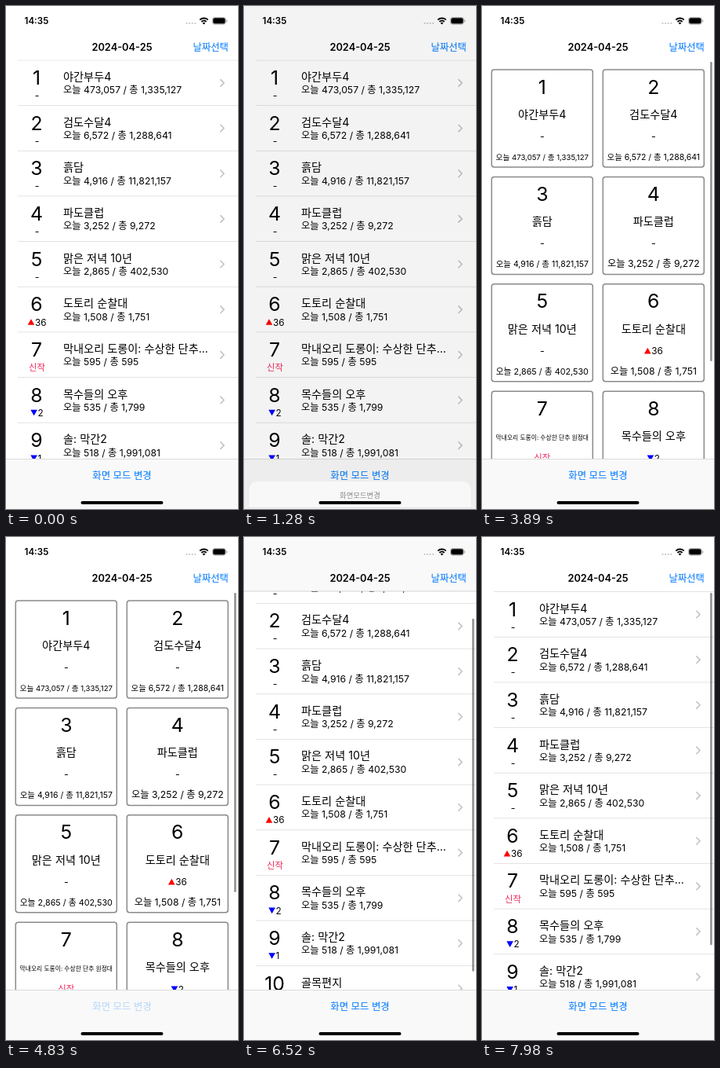
Recreate the animation shown at these times as an HTML page. Size 296 by 640 pixels, loop 8340 ms.

```html
<!DOCTYPE html>
<html lang="ko">
<head>
<meta charset="utf-8">
<style>
html, body { margin: 0; width: 100%; height: 100%; overflow: hidden; background: #fff; }
svg { display: block; width: 296px; height: 640px; }
text { font-family: Inter, 'Noto Sans CJK KR', 'Noto Sans CJK', sans-serif; white-space: pre; }
</style>
</head>
<body>
<svg id="stage" viewBox="0 0 296 640" xmlns="http://www.w3.org/2000/svg"></svg>
<script>
const LOOP = 8340, TOP = 69, VIEW = 507, ROW = 57.65, CELL = 136.4;
const BLUE = [0, 122, 255], GRAY = [140, 140, 145];
const LINE = '#dcdcde', CHROME = '#f9f9f9';

// title, today, total, rank change (null: new entry)
const movies = [
  ['야간부두4', '473,057', '1,335,127', 0],
  ['검도수달4', '6,572', '1,288,641', 0],
  ['흙담', '4,916', '11,821,157', 0],
  ['파도클럽', '3,252', '9,272', 0],
  ['맑은 저녁 10년', '2,865', '402,530', 0],
  ['도토리 순찰대', '1,508', '1,751', 36],
  ['막내오리 도롱이: 수상한 단추 원정대', '595', '595', null],
  ['목수들의 오후', '535', '1,799', -2],
  ['솔: 막간2', '518', '1,991,081', -1],
  ['골목편지', '431', '973,210', -4]
];

const text = (x, y, size, str, attrs = '') =>
  `<text x="${x}" y="${y}" font-size="${size}" ${attrs}>${str}</text>`;
const mid = (x, y, size, str, attrs = '') =>
  text(x, y, size, str, 'text-anchor="middle" ' + attrs);
const rect = (x, y, w, h, fill, attrs = '') =>
  `<rect x="${x}" y="${y}" width="${w}" height="${h}" fill="${fill}" ${attrs}/>`;

function change(cx, cy, n) {
  if (n === null) return mid(cx, cy + 4.2, 11.4, '신작', 'fill="#f2295b"');
  if (!n) return mid(cx, cy + 4, 12.5, '-');
  const label = String(Math.abs(n));
  const x = cx - (9 + label.length * 7.3) / 2;
  const [base, tip] = n > 0 ? [cy + 3.6, cy - 4] : [cy - 3.8, cy + 3.8];
  return `<path d="M${x} ${base}h8.6L${x + 4.3} ${tip}z" fill="${n > 0 ? '#f00' : '#00f'}"/>`
    + text(x + 9.2, cy + 4.3, 11.8, label);
}

const daily = m => `오늘 ${m[1]} / 총 ${m[2]}`;
const shorten = s => s.length > 17 ? s.slice(0, 16) + '...' : s;

function listRow(m, i) {
  const y = TOP + i * ROW;
  return mid(39, y + 31, 24.8, i + 1)
    + change(39.5, y + 45, m[3])
    + text(73, y + 26, 14.2, shorten(m[0]))
    + text(73, y + 42.4, 12.25, daily(m))
    + `<path d="M273.8 ${y + 24.6}l4.3 4.3l-4.3 4.3" fill="none" stroke="#c2c2c5" stroke-width="1.6" stroke-linecap="round" stroke-linejoin="round"/>`
    + rect(15, y + ROW - .4, 281, .8, LINE);
}

function gridCell(m, i) {
  const x = 12.3 + (i % 2) * 142, y = 81 + Math.floor(i / 2) * CELL, cx = x + 64.5;
  return rect(x, y, 129, 124, '#fff', 'rx="3.2" stroke="#8a8a8a" stroke-width="1.5"')
    + mid(cx, y + 30.5, 24.8, i + 1)
    + mid(cx, y + 62, 14.2, m[0], 'class="fit"')
    + change(cx, y + 85, m[3])
    + mid(cx, y + 115, 12.25, daily(m), 'class="fit"');
}

const statusBar = text(23.5, 23.2, 11.6, '14:35', 'font-weight="600"')
  + [0, 1, 2, 3].map(i => `<circle cx="${230.5 + i * 3.6}" cy="22" r="1.1" fill="#c4c4c4"/>`).join('')
  + '<g fill="none" stroke="#000" stroke-width="1.9"><path d="M247.3 17.6a7.4 7.4 0 0 1 10.4 0"/>'
  + '<path d="M249.4 20a4.4 4.4 0 0 1 6.2 0"/></g><path d="M252.5 23.6l-1.8-1.9a2.6 2.6 0 0 1 3.6 0z"/>'
  + rect(263.4, 14.5, 17, 8.8, '#fff', 'rx="2.7" stroke="#a4a4a4" stroke-width=".8"')
  + rect(264.2, 15.3, 15.4, 7.2, '#000', 'rx="2"')
  + rect(281.2, 17.4, 1.1, 3, '#a4a4a4', 'rx=".5"');

const panel = 'rgba(249,249,249,.94)';
const sheetBody = rect(6.5, 0, 283, 76, panel, 'rx="10"')
  + rect(6.5, 33, 283, .7, '#d0d0d2')
  + '<path id="tap" d="M6.5 33.5h283V66a10 10 0 0 1-10 10H16.5a10 10 0 0 1-10-10z" fill="#000" fill-opacity=".09"/>'
  + mid(148, 21.2, 9.4, '화면모드변경', 'fill="#8a8a8c" font-weight="500"')
  + mid(148, 60, 14.6, '', 'id="option" fill="#007aff"')
  + rect(6.5, 82, 283, 43, '#fff', 'rx="10"')
  + mid(148, 109, 14.6, '취소', 'fill="#007aff" font-weight="600"');

const stage = document.getElementById('stage');
stage.innerHTML = `<clipPath id="view"><rect x="0" y="${TOP - .5}" width="296" height="${VIEW + .5}"/></clipPath>`
  + rect(0, 0, 296, 640, '#fff')
  + `<g clip-path="url(#view)"><g id="list">${rect(15, TOP - .4, 281, .8, LINE)}${movies.map(listRow).join('')}</g>`
  + `<g id="grid">${movies.map(gridCell).join('')}</g></g>`
  + rect(291.1, 71, 2.6, 100, '#000', 'id="thumb" rx="1.3"')
  + `<g id="nav">${rect(0, 0, 296, TOP, CHROME)}${rect(0, TOP - .4, 296, .8, '#c8c8ca')}</g>`
  + statusBar
  + mid(148, 56.8, 12.8, '2024-04-25', 'font-weight="600"')
  + text(238.6, 56.6, 12.3, '날짜선택', 'class="tint"')
  + rect(0, 576, 296, 64, CHROME, 'id="bar"') + rect(0, 576, 296, .8, '#d2d2d4', 'id="barLine"')
  + mid(148, 602.2, 12.4, '화면 모드 변경', 'id="mode" class="tint"')
  + rect(0, 0, 296, 640, '#000', 'id="dim"')
  + `<g id="sheet">${sheetBody}</g>`
  + rect(95.5, 630, 105, 4, '#000', 'rx="2"');

const $ = id => document.getElementById(id);
const set = (id, attrs) => { for (const k in attrs) $(id).setAttribute(k, attrs[k]); };
const show = (id, on) => set(id, { visibility: on ? 'visible' : 'hidden' });
const clamp = v => Math.min(1, Math.max(0, v));

// shrink long labels to the cell width
function fitLabels(max) {
  for (const el of document.querySelectorAll('.fit')) {
    const w = el.getComputedTextLength();
    if (w > max) el.setAttribute('font-size', parseFloat(el.getAttribute('font-size')) * max / w);
  }
}
fitLabels(118.5);

// smooth travel through [time, value] points
function along(points, t) {
  if (t <= points[0][0]) return points[0][1];
  for (let i = 1; i < points.length; i++) {
    const [t1, v1] = points[i], [t0, v0] = points[i - 1];
    if (t <= t1) {
      const u = (t - t0) / (t1 - t0);
      return v0 + (v1 - v0) * u * u * (3 - 2 * u);
    }
  }
  return points[points.length - 1][1];
}

// the screen refreshes in bursts: start, end, steps
const bursts = [[360, 1170, 8], [1280, 1850, 6], [3070, 3890, 8], [4010, 4830, 8],
  [4940, 5270, 4], [5460, 6250, 8], [6400, 7220, 8], [7330, 7980, 7]];
function refresh(t) {
  let at = 0;
  for (const [a, b, n] of bursts) {
    if (t < a) break;
    const d = (b - a) / (n - 1);
    at = a + d * Math.min(n - 1, Math.floor((t - a) / d + .02));
  }
  return at;
}

const sheetPath = [[470, 0], [830, 1], [1060, 1], [1170, .6], [1280, .235], [1394, .03], [1500, 0],
  [4830, 0], [5270, 1], [5460, 1], [5573, .55], [5686, .12], [5790, 0]];
const gridPath = [[3070, 0], [3420, 130], [3540, 130], [3890, 0], [4130, -36], [4700, 0]];
const listPath = [[6300, 0], [6760, 92], [6980, 70], [7102, 38], [7220, -8], [7440, -36], [7980, -.6]];

function thumb(off, content, alpha) {
  const max = content - VIEW, room = VIEW - 4;
  const over = Math.max(0, -off, off - max);
  const full = VIEW * VIEW / content + 3, len = full - over;
  const y = off > max ? 71 + room - len : 71 + Math.max(0, off) / max * (room - full);
  set('thumb', { y, height: len, 'fill-opacity': alpha * .43 });
}

function draw(now) {
  const t = refresh(now % LOOP);
  const isGrid = t > 1450 && t < 5850;
  const y = along(isGrid ? gridPath : listPath, t);
  show('list', !isGrid);
  show('grid', isGrid);
  set(isGrid ? 'grid' : 'list', { transform: `translate(0 ${-y})` });

  const alpha = isGrid ? (t >= 3070 ? 1 - clamp((t - 5600) / 350) : 0) : (t >= 6400 ? 1 : 0);
  thumb(y, isGrid ? 680 : 10 * ROW, alpha);
  set('nav', { opacity: clamp((y - 1) / 10) });
  const ended = !isGrid && y >= 70;
  set('bar', { fill: ended ? '#fff' : CHROME });
  show('barLine', !ended);

  const p = along(sheetPath, t);
  set('dim', { 'fill-opacity': p * .2 });
  set('sheet', { transform: `translate(0 ${640 - 149 * p})` });
  show('sheet', p > 0);
  $('option').textContent = isGrid ? '리스트' : '아이콘';
  show('tap', p > 0 && ((t > 930 && t < 1200) || (t > 5450 && t < 5600)));

  const g = clamp((p - .25) / .5);
  const tint = `rgb(${BLUE.map((c, i) => Math.round(c + (GRAY[i] - c) * g))})`;
  for (const el of document.querySelectorAll('.tint')) el.setAttribute('fill', tint);
  const pressed = (t >= 360 && t < 470) || (t > 4800 && t < 4930);
  set('mode', { opacity: pressed ? .27 : 1 });
}

const start = performance.now();
function tick() {
  draw(performance.now() - start);
  requestAnimationFrame(tick);
}
draw(0);
requestAnimationFrame(tick);
</script>
</body>
</html>
```
